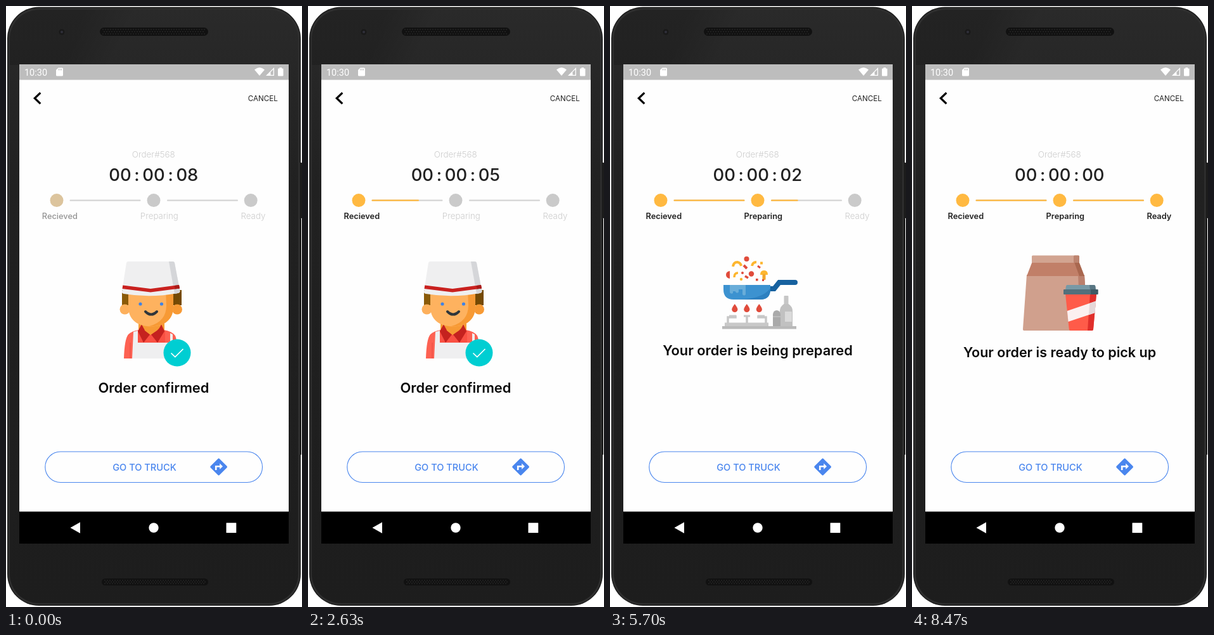
Write an HTML page with a canvas that moves like this. It is 467 by 948 pixels and loops after 9400 ms.

```html
<!DOCTYPE html>
<html lang="en">
<head>
<meta charset="utf-8">
<title>Order status</title>
<style>
html, body { margin: 0; width: 100%; height: 100%; overflow: hidden; background: #fff; }
canvas { display: block; }
</style>
</head>
<body>
<canvas id="stage" width="467" height="948"></canvas>
<script>
const ctx = document.getElementById('stage').getContext('2d');
const LOOP = 9400;
const ORANGE = '#ffb941', GREY = '#cacaca', TRACK = '#d4d4d4', BLUE = '#4a86ee';
const TICKS = [620, 1550, 2550, 3550, 4550, 5470, 6470, 7470];

const clamp = v => Math.max(0, Math.min(1, v));
const ramp = (t, start, span) => clamp((t - start) / span);

function mix(a, b, p) {
  const part = (s, i) => parseInt(s.slice(i, i + 2), 16);
  return 'rgb(' + [1, 3, 5].map(i => Math.round(part(a, i) + (part(b, i) - part(a, i)) * p)) + ')';
}

function rect(x, y, w, h, fill, r = 0) {
  ctx.fillStyle = fill;
  ctx.beginPath();
  ctx.roundRect(x, y, w, h, r);
  ctx.fill();
}

function dot(x, y, r, fill) {
  ctx.fillStyle = fill;
  ctx.beginPath();
  ctx.arc(x, y, r, 0, Math.PI * 2);
  ctx.fill();
}

function shape(d, fill) {
  ctx.fillStyle = fill;
  ctx.fill(new Path2D(d));
}

function line(d, color, width, cap = 'butt') {
  ctx.strokeStyle = color;
  ctx.lineWidth = width;
  ctx.lineCap = cap;
  ctx.lineJoin = 'miter';
  ctx.stroke(new Path2D(d));
}

function text(s, x, y, size, weight, color, family = 'Inter') {
  ctx.font = `${weight} ${size}px ${family}, sans-serif`;
  ctx.fillStyle = color;
  ctx.textAlign = 'center';
  ctx.fillText(s, x, y);
}

function gradient(x0, y0, x1, y1, ...stops) {
  const g = ctx.createLinearGradient(x0, y0, x1, y1);
  stops.forEach(([at, color]) => g.addColorStop(at, color));
  return g;
}

function speaker(x, y, w, h) {
  rect(x, y, w, h, '#111', h / 2);
  for (let row = 0; row < 3; row++) {
    const dy = y + 3 + row * (h - 6) / 2;
    for (let dx = x + 5 + row % 2 * 2; dx < x + w - 4; dx += 4) dot(dx, dy, 0.8, '#343434');
  }
}

function phone() {
  rect(460, 247, 7, 88, '#1c1c1c', 1);
  rect(460, 335, 6, 373, '#1c1c1c', 1);
  rect(2, 1.5, 463, 944.5, '#191919', 50);
  rect(3.2, 2.8, 460.6, 942, '#2e2e2e', 49);
  rect(6, 6, 455, 936, gradient(0, 0, 0, 948,
    [0, '#2a2a2a'], [0.1, '#272727'], [0.3, '#212121'], [1, '#1d1d1d']), 46);
  rect(6, 6, 194, 87, gradient(120, 20, 185, 50,
    [0, 'rgba(0,0,0,.16)'], [1, 'rgba(0,0,0,0)']), [46, 0, 0, 0]);
  speaker(148, 34, 171, 13);
  speaker(151, 903, 168, 11);
  dot(88, 41, 4.5, '#191919');
  dot(88, 41, 2, '#30303a');
}

function statusBar() {
  rect(21, 92, 425, 24.5, '#bdbdbd');
  text('10:30', 47, 109.7, 14.5, 400, '#fff', 'Roboto');
  shape('M82.5 97.5H88.5Q90 97.5 90 99V109Q90 110.5 88.5 110.5H80.5Q79 110.5 79 109V101Z', '#fff');
  for (const x of [82.5, 84.8, 87]) rect(x, 99, 1.1, 2.6, '#bdbdbd');
  shape('M392 100.5Q400 93.5 408 100.5L400 110Z', '#fff');
  shape('M423 97V110H410Z', '#fff');
  shape('M421.7 100V108.7H417.5V104.2Z', '#bdbdbd');
  rect(429, 98.5, 8.5, 12, '#fff', 1);
  rect(431.5, 97, 3.5, 2, '#fff');
}

function chrome() {
  rect(21, 116, 425, 683, '#fefefe');
  statusBar();
  line('M54.3 136.8L45.3 145.5L54.3 154.2', '#000', 3.2);
  text('CANCEL', 405.2, 149.6, 11.6, 400, '#222');
  text('Order#568', 232.7, 239.2, 13.4, 300, '#cdcdcd');

  ctx.strokeStyle = BLUE;
  ctx.lineWidth = 1.1;
  ctx.beginPath();
  ctx.roundRect(61.8, 703, 342.7, 48.5, 24.2);
  ctx.stroke();
  text('GO TO TRUCK', 218.5, 733, 14.6, 500, BLUE);

  ctx.save();
  ctx.translate(335.6, 727);
  ctx.rotate(Math.PI / 4);
  rect(-10, -10, 20, 20, BLUE, 1.8);
  ctx.restore();
  line('M331.2 732V726.2H338', '#fff', 2.6);
  shape('M337.2 721.6L342 726.2L337.2 730.8Z', '#fff');

  rect(21, 797.5, 425, 50.5, '#000');
  shape('M101.5 823L117 814.2V831.8Z', '#fff');
  dot(233, 823, 7.7, '#fff');
  rect(347.5, 815.3, 15.8, 15.6, '#fff', 0.5);
}

function chef() {
  // hair, ears and head
  rect(183, 448, 13, 24, '#8a5a08');
  rect(263, 448, 14, 24, '#754a04');
  dot(187.5, 478.5, 8, '#fdb05c');
  dot(270, 478.5, 8, '#f79a35');
  rect(209, 490, 41, 34, '#f79a35');

  // shirt and apron
  shape('M186 556Q187 525 193 518Q198 513 209 511L228 525L249 511Q262 513 267 520Q271 530 271 556Z', '#fd6152');
  shape('M207 512H251V534H207Z', '#f95043');
  shape('M201 514L208 512V531H259V516L263 518V556H199Z', '#efeff0');
  shape('M208 513L214 502Q220 516 228 515Q240 515 245 502L250 513L239 531L228 517L217 531Z', '#c5221f');
  shape('M217 506Q228 516 241 506L238 512L228 519L219 512Z', '#f79a35');
  line('M196 531V556', '#e94a40', 1);

  shape('M193 448H264V474Q264 493 249 501Q229 510 208 501Q193 493 193 474Z', '#feb25f');
  shape('M252 448H264V474Q264 493 249 501Q238 506 226 505Q253 498 253 472Z', '#f79a35');
  dot(212, 470, 2.6, '#3f83e6');
  dot(245.5, 470, 2.6, '#3f83e6');
  line('M220 482Q229 491 238 482', '#30363b', 4, 'round');

  // hat
  shape('M196 403H263Q265.5 403 266 405L274.5 450Q274 453 271 453Q228 461 186 454Q182 453 183 450L190 405Q190.5 403 193 403Z', '#efeff0');
  shape('M257 403H263Q265.5 403 266 405L274.5 450Q274 453 266 454Z', '#d5d6d9');
  shape('M184.3 440.5L228 446L273 440L274 445.5L228 451.5L183.5 446Z', '#c9211f');
  shape('M266 441L273 440L274 445.5L266.5 446.5Z', '#a91a18');

  dot(270, 547, 21.5, '#00ced2');
  line('M260.5 547.5L266.8 553.5L279.5 541', '#fff', 1.7);
  text('Order confirmed', 233, 609.7, 21.9, 600, '#0b0b0b');
}

function pan() {
  const red = '#e04b3b', yellow = '#fdb62f';
  // tossed food
  dot(215.5, 399, 4, red);
  dot(223, 422.5, 4.2, red);
  dot(209, 421, 2, red);
  dot(207, 431, 2.2, yellow);
  line('M194 411Q195 404 201 404Q206 405 207 410', yellow, 4);
  line('M224 410Q225 404 231 404', yellow, 4);
  line('M196 428Q196 421 202 421', yellow, 3.5);
  shape('M189 418V430Q183 429 183 424Q183 419 189 418Z', red);
  shape('M237 424Q237 417 243 417Q249 417 249 424Z', yellow);
  rect(240.5, 423, 5, 9, '#f2a52b', 1);
  rect(237, 403.5, 4, 4, yellow);
  line('M211 409L216 414', red, 4);
  line('M233 410L237 413', red, 3);
  line('M213 426L218 429', red, 3.5);
  rect(230, 430, 3.6, 3.6, red);
  rect(240, 431, 3, 3, red);

  // pan and handle
  line('M250 446H259L267 436H292', '#17619f', 8);
  dot(292, 436, 4, '#17619f');
  shape('M179 440H253V447Q253 463 237 463H195Q179 463 179 447Z', '#3c92d0');
  shape('M253 445V447Q253 463 237 463H203Q241 462 253 445Z', '#2d80c0');
  shape('M189 440H214V455Q212 458 209 455V447H203V451Q201 454 198 451V450H194V453Q191 455 189 452Z', '#69add9');

  // flames and stove
  for (const x of [196.8, 215.8, 235.3]) {
    shape(`M${x} 470Q${x + 4.6} 476 ${x + 4.6} 478.5A4.6 4.6 0 0 1 ${x - 4.6} 478.5Q${x - 4.6} 476 ${x} 470Z`, red);
  }
  const metal = '#c8c8c8';
  line('M186 500V491H198V488M216 488V500M246 500V491H234V488', metal, 3.5);
  line('M188 489H199M211 489H221M233 489H244', metal, 3);
  rect(181, 499.5, 69, 6, metal);
  rect(177, 505, 117, 4.5, '#b9b9b9');

  // bottles
  rect(274.5, 457, 7, 16, '#c6c6c6', 1);
  shape('M274.5 470H281.5Q288 474 288 481V505H268V481Q268 474 274.5 470Z', '#c1c1c1');
  rect(276, 482, 11, 16, '#dadada');
  shape('M257 505V486Q258 480 263 480Q268 480 269 486V505Z', '#aaaaaa');
  rect(257, 489, 12, 2, '#bcbcbc');
  text('Your order is being prepared', 233, 551, 21.8, 600, '#0b0b0b');
}

function takeaway() {
  // paper bag
  shape('M181 424H272L278 512H177Q174.5 512 175 509Z', '#d0a08d');
  shape('M262 424H272L278 512H266Z', '#bb806d');
  shape('M189.5 404H263.5L272 426H181Z', '#c17f68');
  shape('M256 404H263.5L272 426H264Z', '#a9674f');
  rect(189, 393.5, 75, 11.5, '#d2a491', 1.5);
  rect(255, 393.5, 9, 11.5, '#bd846f', 1.5);

  // cup
  shape('M242 454H291L286 510Q285.8 512 284 512H250Q248 512 247.8 510Z', '#ff5b49');
  shape('M281 454H291L286 510Q285.8 512 284 512H277Z', '#e02f2b');
  shape('M244.8 481L290 465.5L288.4 484L246.5 498Z', '#fbf0f0');
  shape('M280.2 469L290 465.5L288.4 484L278.8 487.2Z', '#e5d8d9');
  shape('M245 440H287Q289 440 289.3 442L290 448H242L243 442Q243.3 440 245 440Z', '#7899a6');
  shape('M280 440H287Q289 440 289.3 442L290 448H281Z', '#587683');
  rect(239, 447, 54.5, 8, '#526f7b', 1);
  rect(282, 447, 11.5, 8, '#3e5964', 1);
  text('Your order is ready to pick up', 233, 554.3, 21.5, 600, '#0b0b0b');
}

function step(x, label, labelX, p) {
  dot(x, 306.6, 10.5, mix(GREY, ORANGE, p));
  const weight = p === 0 ? 300 : p < 1 ? 500 : 600;
  text(label, labelX, 335.5, p === 0 ? 13.3 : 12.8, weight, mix('#cccccc', '#222222', p));
}

function track(x, w, p) {
  rect(x, 305.4, w, 2.4, TRACK, 1);
  if (p > 0) rect(x, 305.4, w * p, 2.4, ORANGE, 1);
}

function timer(t) {
  const left = 8 - TICKS.filter(k => t >= k).length;
  ctx.wordSpacing = '-2.6px';
  text('00 : 00 : 0' + left, 232.8, 275.8, 27.4, 500, '#222');
  ctx.wordSpacing = '0px';
}

function draw(t) {
  ctx.fillStyle = '#fff';
  ctx.fillRect(0, 0, 467, 948);
  phone();
  chrome();
  timer(t);
  track(100.5, 112, ramp(t, 610, 3040));
  track(254, 112, ramp(t, 4540, 3050));
  step(80, 'Recieved', 84.8, ramp(t, -300, 910));
  step(233, 'Preparing', 241.8, ramp(t, 3650, 900));
  step(386.2, 'Ready', 389.9, ramp(t, 7560, 900));
  (t < 3700 ? chef : t < 7620 ? pan : takeaway)();
}

const begin = performance.now();
function frame() {
  draw((performance.now() - begin) % LOOP);
  requestAnimationFrame(frame);
}
frame();
</script>
</body>
</html>
```
